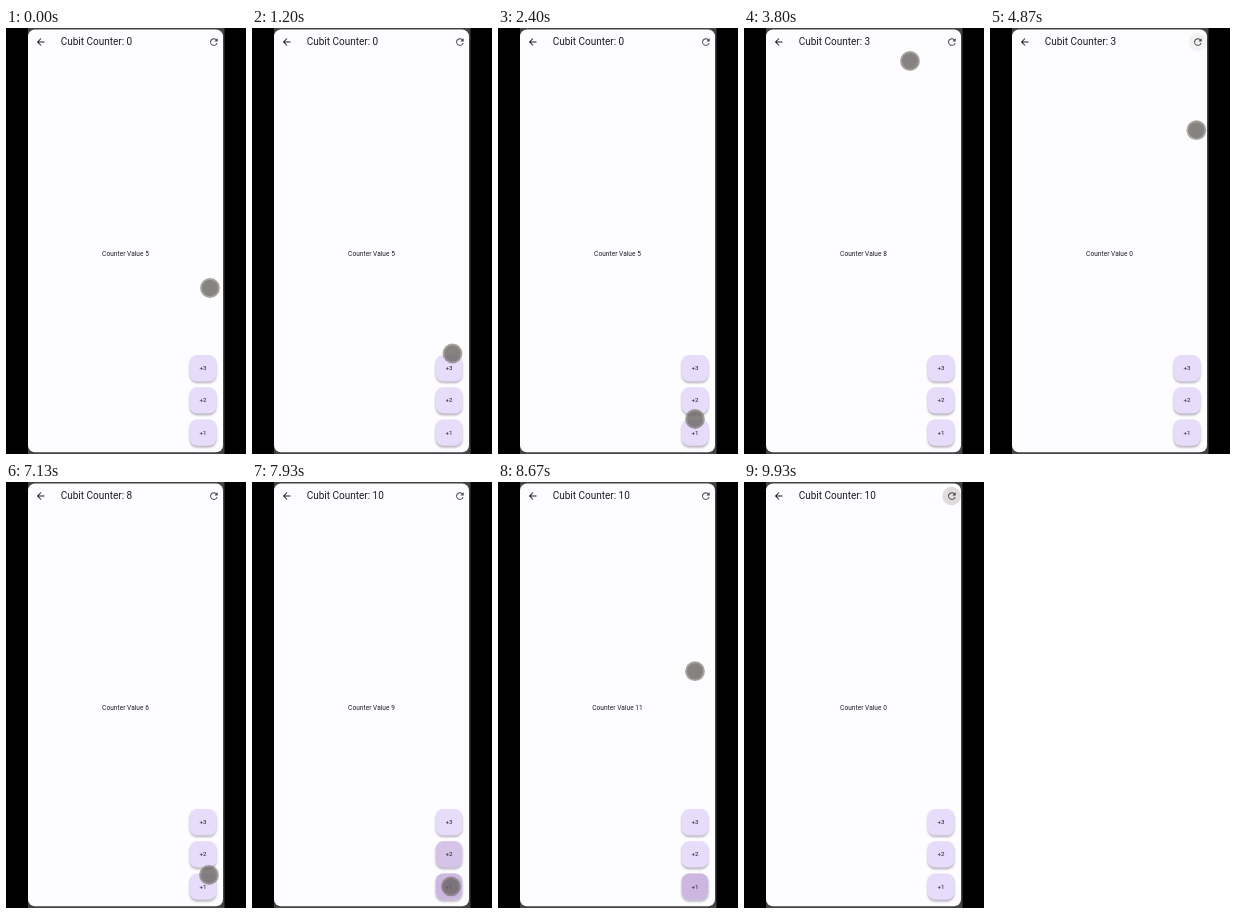
An HTML page that plays this animation: 240 px wide and 426 px high, repeating every 9990 ms.

```html
<!DOCTYPE html>
<html lang="en">
<head>
<meta charset="utf-8">
<title>Counter</title>
<style>
html, body { margin: 0; width: 100%; height: 100%; overflow: hidden; background: #000; }
svg { display: block; width: 100vw; height: 100vh; }
text { font-family: Roboto, sans-serif; fill: #1c1b1f; }
</style>
</head>
<body>
<svg viewBox="0 0 240 426">
  <defs>
    <filter id="soft" x="-30%" y="-30%" width="160%" height="160%">
      <feGaussianBlur stdDeviation="1.3"/>
    </filter>
  </defs>
  <rect width="240" height="426" fill="#000"/>
  <rect x="22" width="196.5" height="426" fill="#424345"/>
  <rect x="22" y="1.4" width="195" height="422.8" rx="7" fill="#fdfcff"/>
  <path transform="translate(29 8.3) scale(.475)" fill="#1c1b1f"
    d="M20 11H7.8l5.6-5.6L12 4l-8 8 8 8 1.4-1.4L7.8 13H20z"/>
  <text id="title" x="54.7" y="17.4" font-size="10"></text>
  <circle id="splash" cx="207.6" cy="14" r="9.2" fill="#dfdddb"/>
  <path transform="translate(202.2 8.3) scale(.475)" fill="#49454f"
    d="M17.65 6.35A8 8 0 1 0 19.73 14h-2.08A6 6 0 1 1 12 6c1.66 0 3.14.69 4.22 1.78L13 11h7V4z"/>
  <text id="value" x="119.5" y="228" font-size="6.5" letter-spacing=".06" text-anchor="middle"></text>
  <g id="buttons"></g>
  <g id="pointer">
    <circle r="9.9" fill="#6d6858" fill-opacity=".6"/>
    <circle r="8" fill="#66626a" fill-opacity=".5"/>
  </g>
</svg>
<script>
const LOOP = 9990, STEP = 1000 / 15, RESET = 0;
const $ = id => document.getElementById(id);
const fabTop = n => 327 + (3 - n) * 32.2;

// evenly spaced taps, each adding an amount or resetting
const burst = (start, gap, ...amounts) =>
  amounts.map((n, i) => ({ t: start + i * gap, n }));

const taps = [
  ...burst(2950, 0, 3), ...burst(4400, 0, RESET),
  ...burst(6200, 200, 3, 2, 1), ...burst(7500, 280, 2, 1, 1, 1),
  ...burst(9550, 0, RESET)
];

// the pointer visits every tapped control and a few places between
const spot = n => n === RESET ? { x: 207, y: 15 } : { x: 199, y: fabTop(n) + 13 };
const stops = [
  { t: 0, x: 204, y: 260 }, { t: 2400, x: 197, y: 391 },
  { t: 3800, x: 166, y: 33 }, { t: 6000, x: 205, y: 314 },
  { t: 7133, x: 203, y: 393 }, { t: 8667, x: 197, y: 189 },
  ...taps.map(p => ({ t: p.t, ...spot(p.n) }))
].sort((a, b) => a.t - b.t);

for (const n of [3, 2, 1]) {
  const y = fabTop(n);
  const box = `x="183.7" y="${y}" width="26.6" height="26.4" rx="7.6"`;
  $("buttons").insertAdjacentHTML("beforeend", `
    <rect ${box} transform="translate(0 1.7)" fill="#6b6572" opacity=".5" filter="url(#soft)"/>
    <rect ${box} fill="#e7dcfa"/>
    <rect ${box} id="ink${n}" fill="#ccb7e0"/>
    <text x="197" y="${y + 15.2}" font-size="6.2" text-anchor="middle">+${n}</text>`);
}

function pointerAt(t) {
  const i = stops.findIndex(s => s.t > t);
  if (i < 0) return stops[stops.length - 1];
  const a = stops[i - 1], b = stops[i], u = (t - a.t) / (b.t - a.t);
  return { x: a.x + (b.x - a.x) * u, y: a.y + (b.y - a.y) * u };
}

// a tapped control stays dark briefly, then fades
const ink = (past, t, n) => Math.max(0, ...past.filter(p => p.n === n)
  .map(p => Math.min(1, (500 - t + p.t) / 100)));

function draw(ms) {
  const t = Math.floor((ms % LOOP + 3.4) / STEP) * STEP;
  const past = taps.filter(p => p.t <= t);
  let value = 5, title = 0;
  for (const { n } of past) {
    value = n === RESET ? 0 : value + n;
    if (n > 1) title += n;
  }
  $("title").textContent = "Cubit Counter: " + title;
  $("value").textContent = "Counter Value " + value;
  for (const n of [1, 2, 3]) $("ink" + n).setAttribute("opacity", ink(past, t, n));
  $("splash").setAttribute("opacity", ink(past, t, RESET));
  const { x, y } = pointerAt(t);
  $("pointer").setAttribute("transform", `translate(${x} ${y})`);
  $("pointer").setAttribute("opacity", t < 9800 ? 1 : 0);
}

const start = performance.now();
function tick() {
  draw(performance.now() - start);
  requestAnimationFrame(tick);
}
tick();
</script>
</body>
</html>
```
